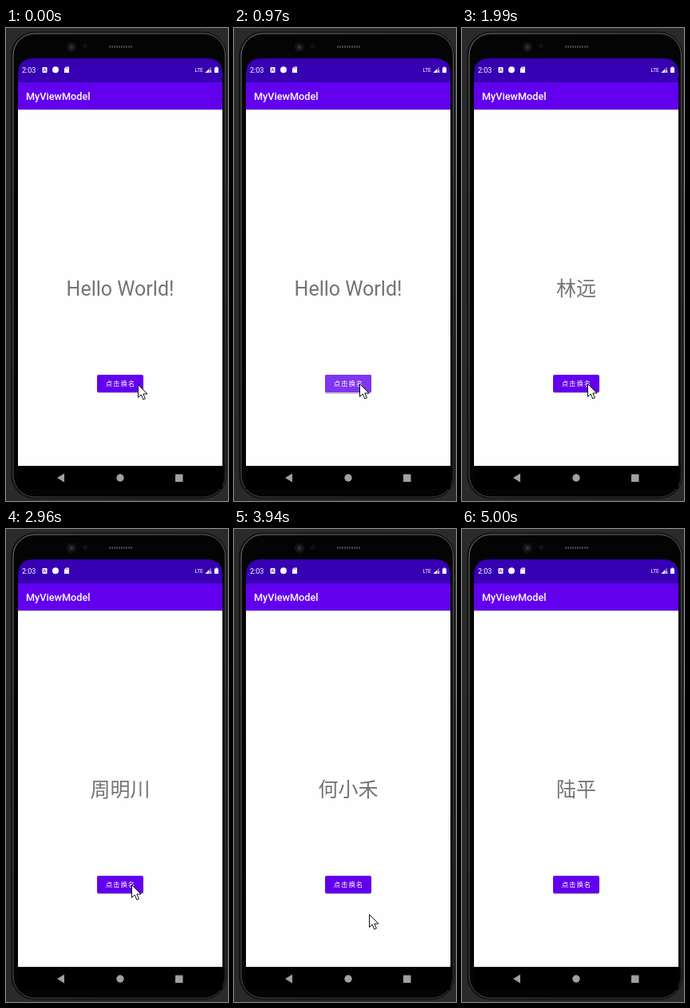
Write an HTML page that moves like this. It is 278 px wide and 592 px high and loops after 5300 ms.

```html
<!DOCTYPE html>
<html lang="zh-CN">
<head>
<meta charset="utf-8">
<style>
  html, body { margin: 0; width: 100%; height: 100%; overflow: hidden; background: #2a2a2a; }
  svg { display: block; width: 278px; height: 592px; }
  text { font-family: Roboto, "Noto Sans CJK SC", "Noto Sans CJK", sans-serif; fill: #fff; }
</style>
</head>
<body>
<svg viewBox="0 0 278 592">
  <defs>
    <linearGradient id="rim" x2=".6" y2="1">
      <stop offset="0" stop-color="#777"/>
      <stop offset=".6" stop-color="#555"/>
      <stop offset="1" stop-color="#333"/>
    </linearGradient>
    <clipPath id="screen"><path d="M15 577V58Q15 38 35 38H251Q271 38 271 58V577Z"/></clipPath>
  </defs>

  <!-- phone body -->
  <rect width="278" height="592" fill="#2a2a2a"/>
  <rect x="6.500" y="5" width="269.500" height="584" rx="29" fill="#111" stroke="#181818"/>
  <rect x="9" y="7" width="265.500" height="580" rx="27" fill="#040404" stroke="url(#rim)"/>
  <circle cx="82" cy="24" r="6" fill="#141418"/>
  <circle cx="82" cy="24" r="2.500" fill="#303034"/>
  <circle cx="99" cy="23" r="3" fill="#101012"/>
  <path d="M129 23.500H159" stroke="#3c3c3c" stroke-width="3" stroke-dasharray="2 1"/>

  <!-- screen -->
  <g clip-path="url(#screen)">
    <rect x="15" y="38" width="256" height="540" fill="#000"/>
    <rect x="15" y="102" width="256" height="446" fill="#fefefe"/>
    <rect x="15" y="102" width="256" height="1" fill="#d4d4d8"/>
    <rect x="15" y="38" width="256" height="30" fill="#3700b3"/>
    <rect x="15" y="68" width="256" height="34" fill="#6200ee"/>
  </g>

  <!-- status bar -->
  <text x="20" y="55.500" font-size="9">2:03</text>
  <rect x="45.500" y="49" width="6" height="7" rx="1" fill="#fff"/>
  <path d="M47 54.500L48.500 50.500L50 54.500" fill="none" stroke="#3700b3" stroke-width=".8"/>
  <circle cx="62" cy="52.300" r="4" fill="#fff"/>
  <path d="M73 56V50.500L75 48.500H79V56Z" fill="#fff"/>
  <path d="M75.500 49.500V51M77.300 49.500V51" stroke="#3700b3" stroke-width=".7"/>
  <text x="236.500" y="55" font-size="6.500">LTE</text>
  <path d="M249.500 56L257 48.500V56Z" fill="#8766d1"/>
  <path d="M249.500 56L254 51.500V56Z" fill="#fff"/>
  <path d="M255 53L257.500 56M257.500 53L255 56" stroke="#fff" stroke-width=".8"/>
  <path d="M261 49.500H262.500V48.500H264.500V49.500H266V56H261Z" fill="#fff"/>

  <text x="25" y="90" font-size="12.700" font-weight="500">MyViewModel</text>
  <text id="label" x="143" y="335" font-size="25" text-anchor="middle" style="fill:#747474"></text>

  <!-- button -->
  <rect id="shadow" x="114" y="435" width="58" height="22" rx="2.500" fill="#c4c4c8"/>
  <rect x="114" y="434" width="58" height="22" rx="2" fill="#6200ee"/>
  <rect id="ripple" x="114" y="434" width="58" height="22" rx="2" fill="#7f35f1"/>
  <text x="124.700" y="448.300" font-size="8.500" letter-spacing=".85">点击换名</text>

  <!-- navigation -->
  <g fill="#a0a0a0">
    <path d="M64 563L73 557.500V568.500Z"/>
    <circle cx="143" cy="563" r="4.700"/>
    <rect x="212" y="558.500" width="9.500" height="9.500" rx=".5"/>
  </g>

  <path id="cursor" d="M.5 .5V16.500L4.200 13L6.800 19L9.400 17.900L6.800 12H12Z" fill="#fff" stroke="#111" stroke-linejoin="round"/>
</svg>
<script>
const LOOP = 5300;
const $ = id => document.getElementById(id);
const label = $('label'), ripple = $('ripple'), shadow = $('shadow'), cursor = $('cursor');

// [start time, text]
const words = [[0, 'Hello World!'], [1940, '林远'], [2960, '周明川'], [3940, '何小禾'], [4920, '陆平']];
// [time, x, y]
const path = [
  [0, 165, 446], [50, 165, 446], [200, 159, 445], [400, 157, 445], [3520, 157, 445],
  [3690, 180, 480], [3900, 180, 480], [3940, 169, 482], [4470, 173, 519],
  [4750, 177, 594], [LOOP, 177, 594]
];
// [time, strength of the press highlight]
const press = [[0, 0], [800, 0], [940, 1], [990, 1], [1210, 0], [LOOP, 0]];

function at(keys, t) {
  const i = keys.findIndex(k => k[0] > t);
  const a = keys[i - 1], b = keys[i];
  const p = (t - a[0]) / (b[0] - a[0]);
  return a.slice(1).map((v, n) => v + (b[n + 1] - v) * p);
}

function draw() {
  const t = performance.now() % LOOP;
  const word = words.filter(w => w[0] <= t).pop()[1];
  if (label.textContent !== word) label.textContent = word;
  const [glow] = at(press, t);
  ripple.setAttribute('opacity', glow);
  shadow.setAttribute('y', 435 + glow);
  const [x, y] = at(path, t);
  cursor.setAttribute('transform', `translate(${Math.round(x)} ${Math.round(y)})`);
  requestAnimationFrame(draw);
}
draw();
</script>
</body>
</html>
```
